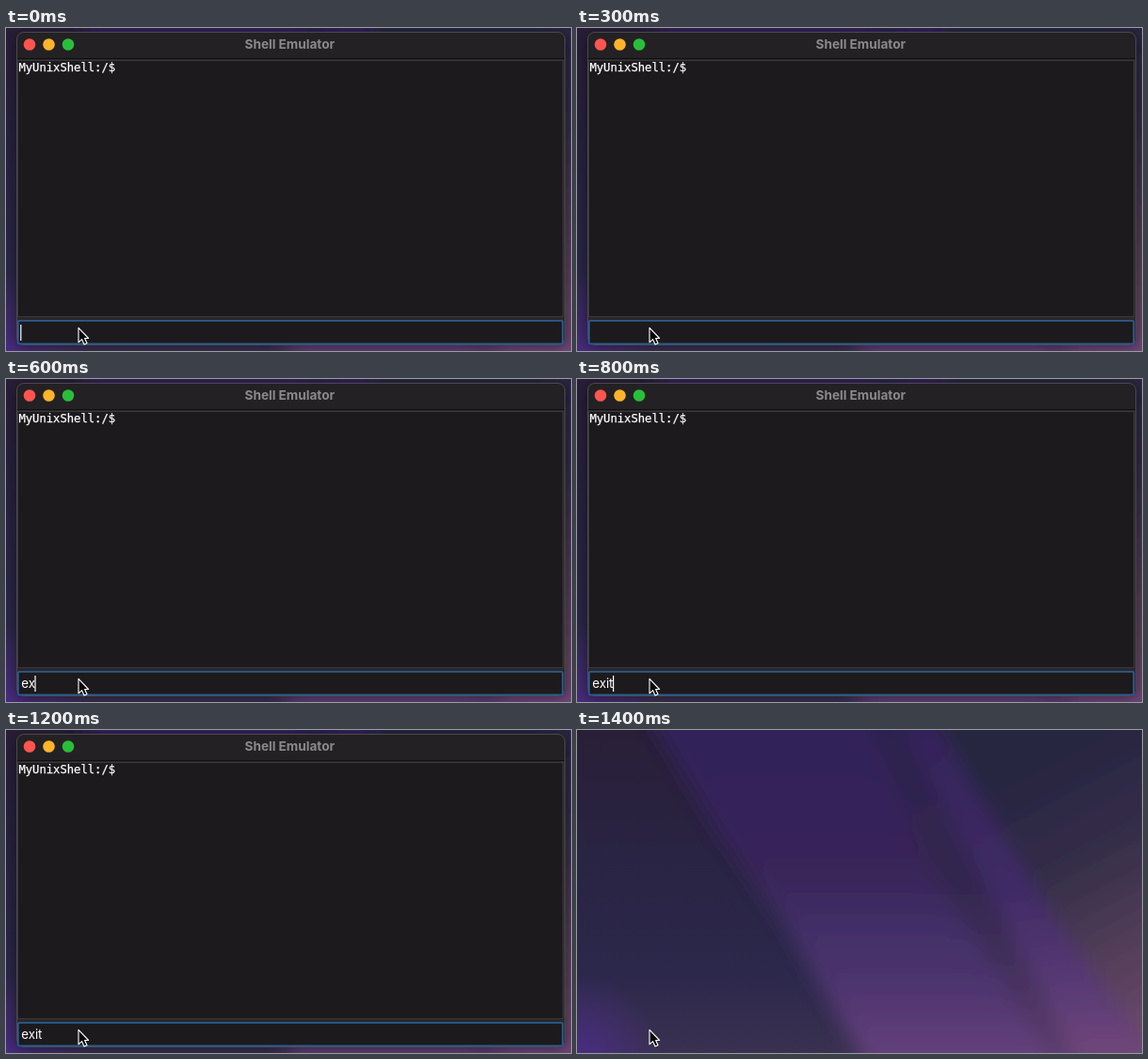
Write an HTML page that moves like this. It is 600 px wide and 343 px high and loops after 1.5 s.

```html
<!DOCTYPE html>
<html lang="en">
<head>
<meta charset="utf-8">
<title>Shell Emulator</title>
<style>
  html, body { margin: 0; width: 100%; height: 100%; overflow: hidden; background: #29233f; }
  svg { display: block; width: 100vw; height: 100vh; }
  .title { font: 700 13.6px Inter, sans-serif; fill: #8b898b; text-anchor: middle; }
  .prompt { font: 12.2px "DejaVu Sans Mono", monospace; fill: #fff; stroke: #fff; stroke-width: .25px; }
  .entry { font: 13.3px Inter, sans-serif; fill: #fff; }
</style>
</head>
<body>
<svg viewBox="0 0 600 343" preserveAspectRatio="none">
  <defs>
    <linearGradient id="left" x2="0" y2="1">
      <stop offset="0" stop-color="#291f38"/>
      <stop offset=".4" stop-color="#292443"/>
      <stop offset=".75" stop-color="#2c284b"/>
      <stop offset="1" stop-color="#3a3151"/>
    </linearGradient>
    <linearGradient id="band" gradientUnits="userSpaceOnUse" x1="0" y1="0" x2="0" y2="343">
      <stop offset="0" stop-color="#31205a"/>
      <stop offset=".3" stop-color="#36235a"/>
      <stop offset=".45" stop-color="#3a2559"/>
      <stop offset=".6" stop-color="#412e66"/>
      <stop offset=".8" stop-color="#4e356f"/>
      <stop offset="1" stop-color="#63407a"/>
    </linearGradient>
    <linearGradient id="gap" gradientUnits="userSpaceOnUse" x1="0" y1="0" x2="0" y2="343">
      <stop offset="0" stop-color="#2c2150"/>
      <stop offset=".5" stop-color="#33284f"/>
      <stop offset=".75" stop-color="#44305d"/>
      <stop offset="1" stop-color="#5c3d6d"/>
    </linearGradient>
    <linearGradient id="ray" gradientUnits="userSpaceOnUse" x1="0" y1="0" x2="0" y2="343">
      <stop offset="0" stop-color="#33235b"/>
      <stop offset=".5" stop-color="#412b67"/>
      <stop offset=".8" stop-color="#593a75"/>
      <stop offset="1" stop-color="#70467a"/>
    </linearGradient>
    <linearGradient id="right" gradientUnits="userSpaceOnUse" x1="470" y1="40" x2="620" y2="320">
      <stop offset="0" stop-color="#272541"/>
      <stop offset=".35" stop-color="#332d48"/>
      <stop offset=".7" stop-color="#533e59"/>
      <stop offset="1" stop-color="#6c4a6b"/>
    </linearGradient>
    <radialGradient id="glow" gradientUnits="userSpaceOnUse" cx="0" cy="350" r="90">
      <stop offset="0" stop-color="#4a2c85"/>
      <stop offset="1" stop-color="#4a2c85" stop-opacity="0"/>
    </radialGradient>
    <filter id="soft" filterUnits="userSpaceOnUse" x="-60" y="-60" width="760" height="480">
      <feGaussianBlur stdDeviation="10"/>
    </filter>
    <filter id="shade" filterUnits="userSpaceOnUse" x="-40" y="-40" width="700" height="440">
      <feGaussianBlur stdDeviation="8"/>
    </filter>
  </defs>

  <g id="wallpaper">
    <rect width="600" height="343" fill="url(#left)"/>
    <rect width="120" height="343" fill="url(#glow)"/>
    <g filter="url(#soft)">
      <path fill="url(#band)" d="M58-40L84 0L150 110L215 200L300 343L326 390H700V-40Z"/>
      <path fill="url(#gap)" d="M296-40L312 0L370 140L430 235L500 343L530 390H700V-40Z"/>
      <path fill="url(#ray)" d="M330-40L348 0L420 135L474 240L526 343L550 390H700V-40Z"/>
      <path fill="url(#right)" d="M364-40L386 0L444 100L506 200L572 290L612 343L640 390H700V-40Z"/>
    </g>
  </g>

  <g id="window">
    <rect x="8" y="6" width="588" height="334" rx="10" fill="#000" opacity=".4" filter="url(#shade)"/>
    <rect x="11" y="4" width="583" height="333" rx="8" fill="#2a282a"/>
    <path d="M11 33V12a8 8 0 0 1 8-8H586a8 8 0 0 1 8 8V33Z" fill="#232123"/>
    <rect x="11" y="32" width="583" height="1" fill="#111011"/>
    <rect x="12.5" y="34.5" width="579" height="272" fill="#1c1a1c" stroke="#3a383a"/>
    <rect x="11.5" y="4.5" width="582" height="332" rx="7.5" fill="none" stroke="#4b494c"/>
    <circle cx="25" cy="17.5" r="6.3" fill="#fe5550"/>
    <circle cx="45.5" cy="17.5" r="6.3" fill="#fdb42a"/>
    <circle cx="66" cy="17.5" r="6.3" fill="#29bf3a"/>
    <text class="title" x="301.3" y="21.7">Shell Emulator</text>
    <text class="prompt" x="13.4" y="46.3">MyUnixShell:/$</text>
    <rect x="12.8" y="310.8" width="578.4" height="24.6" rx="1.5" fill="#1c1a1c" stroke="#2b5c90" stroke-width="1.8"/>
    <text class="entry" id="entry" x="16.2" y="328.4"></text>
    <rect id="caret" y="315" width="1.2" height="17" fill="#fff"/>
  </g>

  <path d="M77 318.4V333.8L80.5 330.6L83 336L86 334.7L83.6 329.5H87.6Z" fill="#080808" stroke="#fff" stroke-width="1.1" stroke-linejoin="round"/>
</svg>
<script>
  const LOOP = 1500, CLOSE = 1300;
  const WORD = "exit", TYPE_START = 500, KEY_TIME = 100;
  const CARET_OFF = [[200, TYPE_START], [1100, CLOSE]];
  const [shell, entry, caret] = ["window", "entry", "caret"].map(id => document.getElementById(id));

  const show = (node, on) => node.setAttribute("visibility", on ? "inherit" : "hidden");

  function draw(t) {
    const keys = Math.floor((t - TYPE_START) / KEY_TIME) + 1;
    const typed = WORD.slice(0, Math.max(0, keys));
    entry.textContent = typed;
    caret.setAttribute("x", typed ? 15.7 + entry.getComputedTextLength() : 15.2);
    show(caret, !CARET_OFF.some(([from, to]) => t >= from && t < to));
    show(shell, t < CLOSE);
  }

  const start = performance.now();
  function tick() {
    draw((performance.now() - start) % LOOP);
    requestAnimationFrame(tick);
  }
  tick();
</script>
</body>
</html>
```
